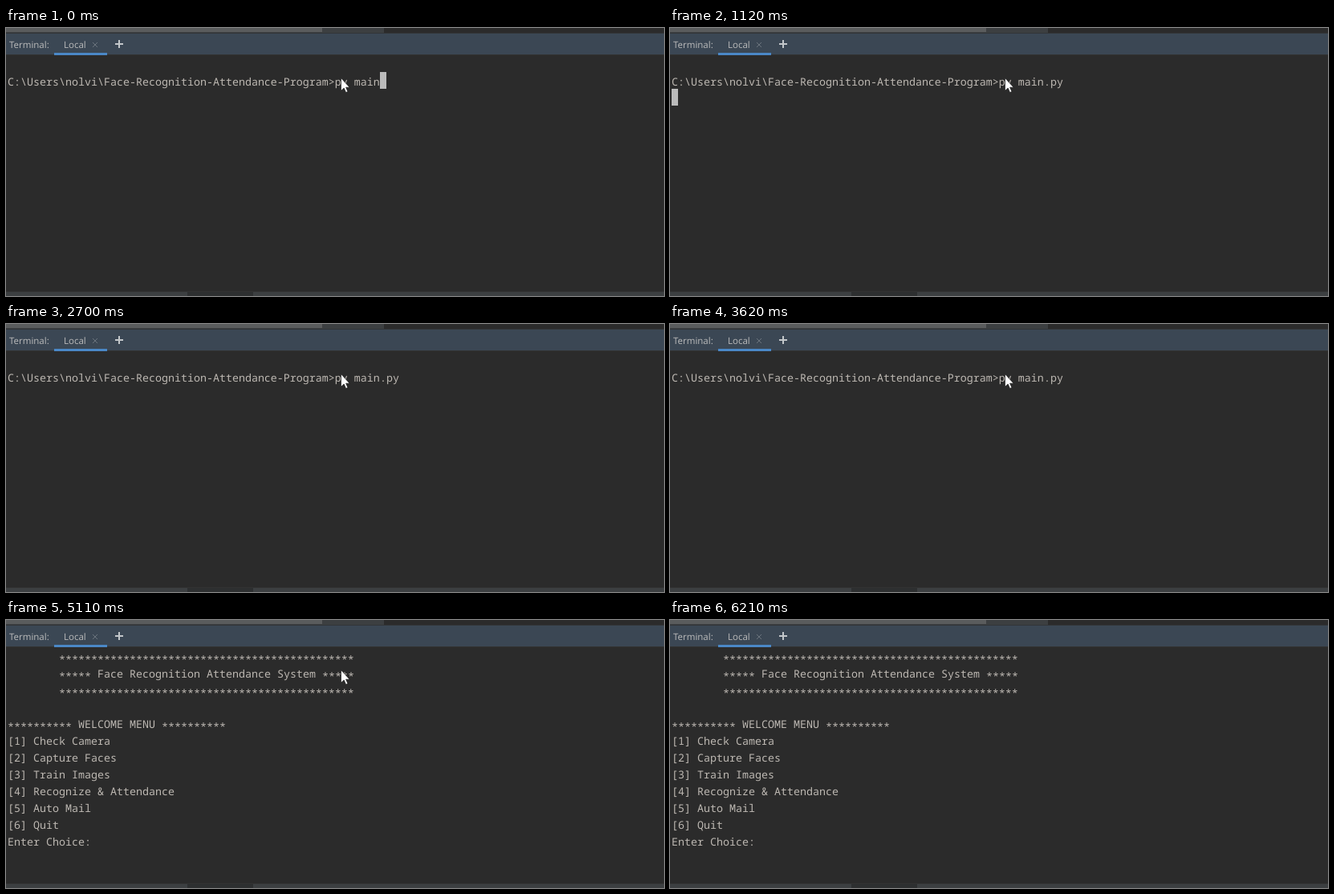
An HTML page for the animation above (6.5 s loop, 820 by 335 pixels).

```html
<!DOCTYPE html>
<html lang="en">
<head>
<meta charset="utf-8">
<title>Terminal</title>
<style>
  html, body { margin: 0; width: 100%; height: 100%; overflow: hidden; background: #2b2b2b; }
  svg { display: block; width: 820px; height: 335px; }
  text { white-space: pre; text-rendering: geometricPrecision; }
  .ui { font: 11.5px "Open Sans", "Noto Sans", sans-serif; fill: #bbb; }
  .term { font: 500 13.3333px "Noto Sans Mono", "DejaVu Sans Mono", monospace; fill: #bdb8b2; }

  /* Hard cuts on a 6.5 s loop */
  .cut { animation: 6.5s step-end infinite; }
  #prompt { animation-name: prompt; }
  #menu { animation-name: menu; }
  #dot { animation-name: type-dot; }
  #p { animation-name: type-p; }
  #y { animation-name: type-y; }
  #caret { animation-name: caret-move, caret-blink; }
  #mouse { animation-name: mouse; }

  @keyframes prompt { 0% { opacity: 1 } 64.307%, 100% { opacity: 0 } }
  @keyframes menu { 0% { opacity: 0 } 64.307%, 100% { opacity: 1 } }
  @keyframes type-dot { 0% { opacity: 0 } 4.307%, 100% { opacity: 1 } }
  @keyframes type-p { 0% { opacity: 0 } 8.615%, 100% { opacity: 1 } }
  @keyframes type-y { 0% { opacity: 0 } 13.384%, 100% { opacity: 1 } }

  @keyframes caret-move {
    0% { transform: translate(466px, 55px) }
    4.307% { transform: translate(474px, 55px) }
    8.615% { transform: translate(482px, 55px) }
    13.384% { transform: translate(490px, 55px) }
    17.23% { transform: translate(2px, 76px) }
    64.307%, 100% { transform: translate(114px, 265px) }
  }
  @keyframes caret-blink {
    0%, 32.923%, 47.692%, 64.307%, 87.076% { opacity: 1 }
    25.23%, 41.538%, 55.692%, 78.615%, 95.538%, 100% { opacity: 0 }
  }
  @keyframes mouse {
    0% { transform: translate(417px, 62px); opacity: 1 }
    84.769% { transform: translate(514px, 110px); opacity: 1 }
    87.076% { transform: translate(677px, 232px); opacity: 1 }
    88.923%, 100% { transform: translate(677px, 232px); opacity: 0 }
  }
</style>
</head>
<body>
<svg viewBox="0 0 820 335">
  <rect width="820" height="335" fill="#2b2b2b"/>

  <!-- Editor edge and tool window header -->
  <g shape-rendering="crispEdges">
    <rect width="471" height="6" fill="#3c3f41"/>
    <rect width="394" height="5" fill="#5a5c5d"/>
    <rect y="6" width="820" height="1" fill="#323537"/>
    <rect y="7" width="820" height="26" fill="#3b4754"/>
    <rect y="33" width="820" height="1" fill="#323232"/>
    <rect x="60" y="31" width="66" height="3" fill="#4a88c7"/>
    <path d="M136 19h10v2h-10zM140 15h2v10h-2z" fill="#c3c7ca"/>
    <rect y="330" width="820" height="5" fill="#3c3f41"/>
    <rect x="226" y="330" width="82" height="5" fill="#2d2f30"/>
    <rect y="329" width="820" height="1" fill="#323232"/>
  </g>
  <text class="ui" x="4" y="25">Terminal:</text>
  <text class="ui" x="72" y="25">Local</text>
  <path d="M108 18l6 6m0-6l-6 6" stroke="#6c757e"/>

  <g id="prompt" class="term cut">
    <text x="2" y="72">C:\Users\nolvi\Face-Recognition-Attendance-Program&gt;py main</text>
    <text id="dot" class="cut" x="466" y="72">.</text>
    <text id="p" class="cut" x="474" y="72">p</text>
    <text id="y" class="cut" x="482" y="72">y</text>
  </g>

  <g id="menu" class="term cut">
    <!-- Asterisks sit lower, centred on the small letters -->
    <g transform="translate(0 2.6)">
      <text x="66" y="51">**********************************************</text>
      <text x="66" y="72">*****</text>
      <text x="394" y="72">*****</text>
      <text x="66" y="93">**********************************************</text>
      <text x="2" y="135">**********</text>
      <text x="194" y="135">**********</text>
    </g>
    <text x="114" y="72">Face Recognition Attendance System</text>
    <text x="90" y="135">WELCOME MENU</text>
    <text x="2" y="156">[1] Check Camera</text>
    <text x="2" y="177">[2] Capture Faces</text>
    <text x="2" y="198">[3] Train Images</text>
    <text x="2" y="219">[4] Recognize &amp; Attendance</text>
    <text x="2" y="240">[5] Auto Mail</text>
    <text x="2" y="261">[6] Quit</text>
    <text x="2" y="282">Enter Choice:</text>
  </g>

  <rect id="caret" class="cut" width="8" height="21" fill="#bbb"/>
  <path id="mouse" class="cut" d="M.5.5V16.5L4.2 13.1 6.6 18.6 9 17.5 6.6 12.2H11.2Z" fill="#fff" stroke="#1c1c1c" stroke-width=".7"/>
</svg>
</body>
</html>
```
